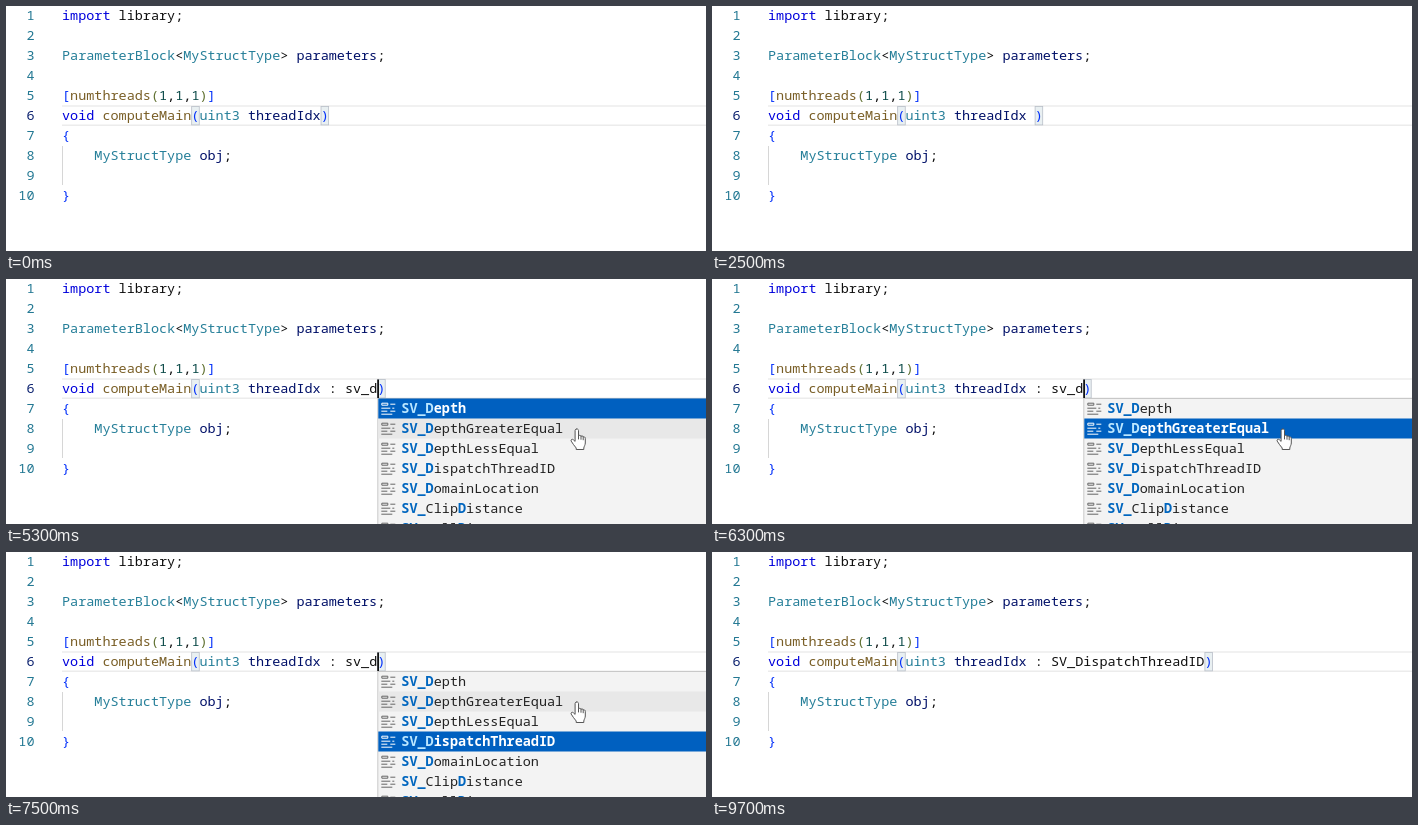
An HTML page that plays this animation: 700x245 px, repeating every 9800 ms.

```html
<!DOCTYPE html>
<html lang="en">
<head>
<meta charset="utf-8">
<title>Code completion</title>
<style>
  html, body { margin: 0; width: 100%; height: 100%; overflow: hidden; background: #fff; }
  svg { display: block; }
  text { font: 13.475px "Noto Sans Mono", "DejaVu Sans Mono", monospace; white-space: pre; }
</style>
</head>
<body>
<svg id="stage" width="700" height="245" viewBox="0 0 700 245"></svg>
<script>
const LOOP = 9800, CHAR = 8.085, LEFT = 56, ROW = 20, LIST_TOP = 119.5, BLINK = 500;
const INK = { k: '#0000dc', t: '#267f99', v: '#001068', f: '#795e26', n: '#0b4a48',
              b: '#0431fa', g: '#5f7030', p: '#101010' };
const stage = document.getElementById('stage');

function add(parent, tag, attrs = {}, content) {
  const node = document.createElementNS('http://www.w3.org/2000/svg', tag);
  set(node, attrs);
  if (content !== undefined) node.textContent = content;
  parent.appendChild(node);
  return node;
}
function set(node, attrs) {
  for (const key in attrs) node.setAttribute(key, attrs[key]);
}
const show = (node, on) => set(node, { visibility: on ? 'visible' : 'hidden' });
const colX = col => LEFT + col * CHAR;
const baseline = line => 14 + ROW * (line - 1);

// Each token is [ink key, text].
function codeLine(line, col, tokens) {
  const text = add(stage, 'text', { x: colX(col), y: baseline(line) });
  return tokens.map(([ink, s]) => add(text, 'tspan', { fill: INK[ink] }, s));
}

// Editor
for (const y of [100, 119.3])
  add(stage, 'path', { d: `M${LEFT} ${y}H700`, stroke: '#ececec', 'stroke-width': 1.4 });
add(stage, 'path', { d: 'M56.5 140V179', stroke: '#d6d6d6' });

const bracketBox = () => add(stage, 'rect', { y: 100.5, width: 7.6, height: 18.4, fill: '#e9f0f2',
                                             stroke: '#b9bfc8', 'stroke-width': 0.8 });
set(bracketBox(), { x: colX(16) + 0.3 });
const closeBox = bracketBox();

for (let n = 1; n <= 10; n++)
  add(stage, 'text', { x: 28.5, y: baseline(n), 'text-anchor': 'end',
                       fill: n === 6 ? '#0b216f' : '#237893' }, n);

codeLine(1, 0, [['k', 'import'], ['p', ' library;']]);
codeLine(3, 0, [['t', 'ParameterBlock'], ['p', '<'], ['t', 'MyStructType'], ['p', '> '],
                ['v', 'parameters'], ['p', ';']]);
codeLine(5, 0, [['b', '['], ['f', 'numthreads'], ['g', '('], ['n', '1'], ['p', ','], ['n', '1'],
                ['p', ','], ['n', '1'], ['g', ')'], ['b', ']']]);
const signature = codeLine(6, 0, [['k', 'void '], ['f', 'computeMain'], ['b', '('], ['t', 'uint3 '],
                ['v', 'threadIdx'], ['p', ''], ['p', ''], ['b', ')']]);
const [colon, semantic] = signature.slice(5, 7);
codeLine(7, 0, [['b', '{']]);
codeLine(8, 4, [['t', 'MyStructType'], ['v', ' obj'], ['p', ';']]);
codeLine(10, 0, [['b', '}']]);

const caret = add(stage, 'rect', { y: 100.5, width: 1.6, height: 18.5, fill: '#000' });

// Suggestion list; positions inside are relative to its left edge
const popup = add(stage, 'g');
add(popup, 'rect', { x: 0.5, y: LIST_TOP, width: 400, height: 160, fill: '#f3f3f3', stroke: '#c8c8c8' });
const hover = add(popup, 'rect', { x: 1, y: LIST_TOP + ROW, width: 400, height: ROW, fill: '#e8e8e8' });
const picked = add(popup, 'rect', { x: 1, width: 400, height: ROW, fill: '#0060c0' });
const ICON = 'M1.5 2.5h6v2h-6zM10 3.5h5M1 7.5h9M12 7.5h2M1 10.5h6M10 10.5h5M1 13.5h11';
const rows = Array.from({ length: 7 }, (_, i) => {
  const y = LIST_TOP + i * ROW;
  return {
    icon: add(popup, 'path', { d: ICON, fill: 'none', transform: `translate(3 ${y + 2.2})` }),
    label: add(popup, 'text', { x: 24, y: y + 14.6 })
  };
});
const hand = add(stage, 'path', {
  d: 'M570 150.2c1.2-.8 2.5 0 2.5 1.4v5.2c1-.8 2.2-.5 2.5.5.9-.7 2-.3 2.2.7 1-.5 2.1.1 2.1 1.4v4.6'
   + 'c0 2-1.2 3.2-1.5 5v1.5h-7.6v-1.5c-1.8-2-3.6-4.6-5-6.9-.7-1.4.9-2.5 2.1-1.4l1.8 1.7v-10.6'
   + 'c0-.7.3-1.3.9-1.6zM572.5 156.8v3.2M575 157.3v3M577.2 158v2.8',
  fill: '#fff', stroke: '#555', 'stroke-width': 1, 'stroke-linejoin': 'round', 'stroke-linecap': 'round'
});

const BROAD = ['ClipDistance', 'Coverage', 'CullDistance', 'Depth', 'DepthGreaterEqual',
               'DepthLessEqual', 'DispatchThreadID'];
const NARROW = ['Depth', 'DepthGreaterEqual', 'DepthLessEqual', 'DispatchThreadID',
                'DomainLocation', 'ClipDistance', 'CullDistance'];

// Indices of the label letters matched, in order, by the typed word
function matches(label, typed) {
  const found = new Set();
  let from = 0;
  for (const ch of typed.toLowerCase()) {
    const at = label.toLowerCase().indexOf(ch, from);
    found.add(at);
    from = at + 1;
  }
  return found;
}

function fillPopup(typed, selected) {
  const names = typed.length > 3 ? NARROW : BROAD;
  rows.forEach(({ icon, label }, i) => {
    const name = 'SV_' + names[i], hit = matches(name, typed), on = i === selected;
    set(icon, { stroke: on ? '#fff' : '#666' });
    set(label, { fill: on ? '#fff' : '#222' });
    label.textContent = '';
    [...name].forEach((ch, j) => add(label, 'tspan', hit.has(j)
      ? { fill: on ? '#bbe7ff' : '#0066bf', 'font-weight': 700 }
      : { 'font-weight': on ? 600 : 400 }, ch));
  });
  set(picked, { y: LIST_TOP + selected * ROW });
  show(hover, selected !== 1);
}

// [time, text before the word, word]; every keystroke restarts the caret blink
const KEYS = [[-800, '', ''], [1000, ' ', ''], [3700, ' :', ''], [3800, ' : ', ''], [4000, ' : ', 's'],
              [4600, ' : ', 'sv'], [4900, ' : ', 'sv_'], [5200, ' : ', 'sv_d'],
              [8200, ' : ', 'SV_DispatchThreadID']];
const OPEN = 4100, ACCEPT = 8200, DOWN = [6200, 6500, 7100];
let drawn = '';

function render(t) {
  const [since, lead, word] = KEYS.filter(key => key[0] <= t).pop();
  const selected = DOWN.filter(time => time <= t).length;
  const open = t >= OPEN && t < ACCEPT;
  const x = colX(32 + lead.length + word.length);

  show(caret, Math.floor((t - since) / BLINK) % 2 === 0);
  const state = [since, selected, open].join();
  if (state === drawn) return;
  drawn = state;

  colon.textContent = lead;
  semantic.textContent = word;
  set(closeBox, { x: x + 0.3 });
  set(caret, { x });
  show(hand, open);
  set(popup, { display: open ? 'inline' : 'none', transform: `translate(${x} 0)` });
  if (open) fillPopup(word, selected);
}

const start = performance.now();
function tick() {
  render((performance.now() - start) % LOOP);
  requestAnimationFrame(tick);
}
tick();
</script>
</body>
</html>
```
